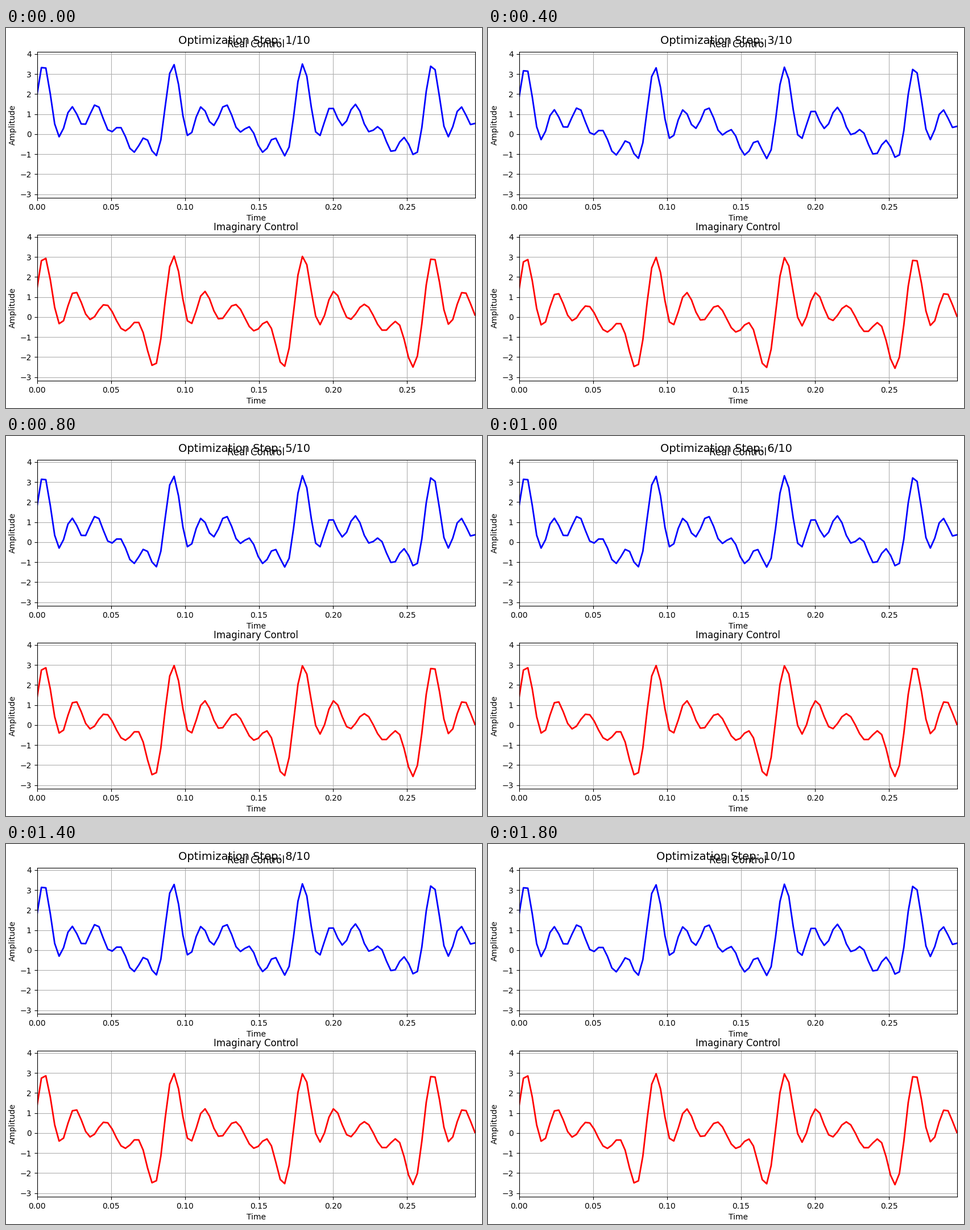
Animation, 837 px wide and 669 px high, one loop 2000 ms. Source, as a matplotlib script:

```python
import numpy as np
import matplotlib.pyplot as plt
from matplotlib.animation import FuncAnimation

W, H, DPI = 837, 669, 100
STEPS = 10
SAMPLES = 100
SPAN = 0.2959      # time covered by the samples
PERIOD = 29.3      # base period, in samples
HARMONICS = 6

plt.rcParams["font.family"] = "DejaVu Sans"

# Control amplitudes at every third sample, smoothed by a Fourier series.
REAL_KNOTS = [2.0, 2.0, 0.28, 1.0, 1.0, 0.75, 0.32, -0.70, -0.20, -1.06,
              3.02, 0.92, 0.86, 0.62, 1.36, 0.35, 0.37, -0.90, -0.20, -0.65,
              3.49, 0.12, 1.28, 0.43, 1.49, 0.13, 0.19, -0.82, -0.49, 0.30,
              3.22, -0.13, 1.36, 0.53]
IMAG_KNOTS = [1.42, 1.86, -0.19, 1.23, -0.12, 0.61, -0.19, -0.53, -0.78, -2.31,
              2.51, 0.89, 0.32, 0.91, -0.06, 0.62, -0.47, -0.33, -1.38, -1.54,
              3.03, 0.04, 0.86, 0.49, 0.14, 0.49, -0.65, -0.22, -2.03, -0.35,
              2.87, -0.35, 1.21, 0.10]

# Share of the total correction reached after each optimization step.
PROGRESS = [0, 0.64, 0.76, 0.86, 0.88, 0.885, 0.89, 0.91, 0.98, 1]


def basis(index):
    phase = 2 * np.pi * np.outer(index, np.arange(1, HARMONICS + 1)) / PERIOD
    return np.hstack([np.ones((len(index), 1)), np.cos(phase), np.sin(phase)])


def waveform(knots):
    known = np.arange(0, SAMPLES, 3)
    coef = np.linalg.lstsq(basis(known), np.array(knots), rcond=None)[0]
    return basis(np.arange(SAMPLES)) @ coef


def make_panel(top, bottom, title, color):
    left, right = 54.5, 824.5
    ax = fig.add_axes([left / W, 1 - bottom / H,
                       (right - left) / W, (bottom - top) / H])
    ax.set(xlim=(0, SPAN), ylim=(-3.174, 4.095), title=title,
           xlabel="Time", ylabel="Amplitude")
    ax.set_xticks(np.arange(0, 0.26, 0.05))
    ax.set_yticks(range(-3, 5))
    ax.grid(True)
    return ax.plot(time, np.zeros(SAMPLES), color=color, lw=2)[0]


# The small margin keeps the pixel size from being rounded down.
fig = plt.figure(figsize=((W + 0.01) / DPI, (H + 0.01) / DPI), dpi=DPI,
                 facecolor="white")
time = np.linspace(0, SPAN, SAMPLES)
heading = fig.suptitle("", fontsize=14)

real_wave = waveform(REAL_KNOTS)
imag_wave = waveform(IMAG_KNOTS)
real_line = make_panel(42.4, 298.9, "Real Control", "blue")
imag_line = make_panel(364.4, 620.9, "Imaginary Control", "red")


def update(step):
    done = PROGRESS[step]
    real_line.set_ydata(real_wave * (1 - 0.006 * done) - 0.188 * done)
    imag_line.set_ydata(imag_wave - 0.078 * done)
    heading.set_text(f"Optimization Step: {step + 1}/{STEPS}")
    return real_line, imag_line, heading


anim = FuncAnimation(fig, update, frames=STEPS, interval=200,
                     repeat=True, repeat_delay=0, blit=False)
plt.show()
```
